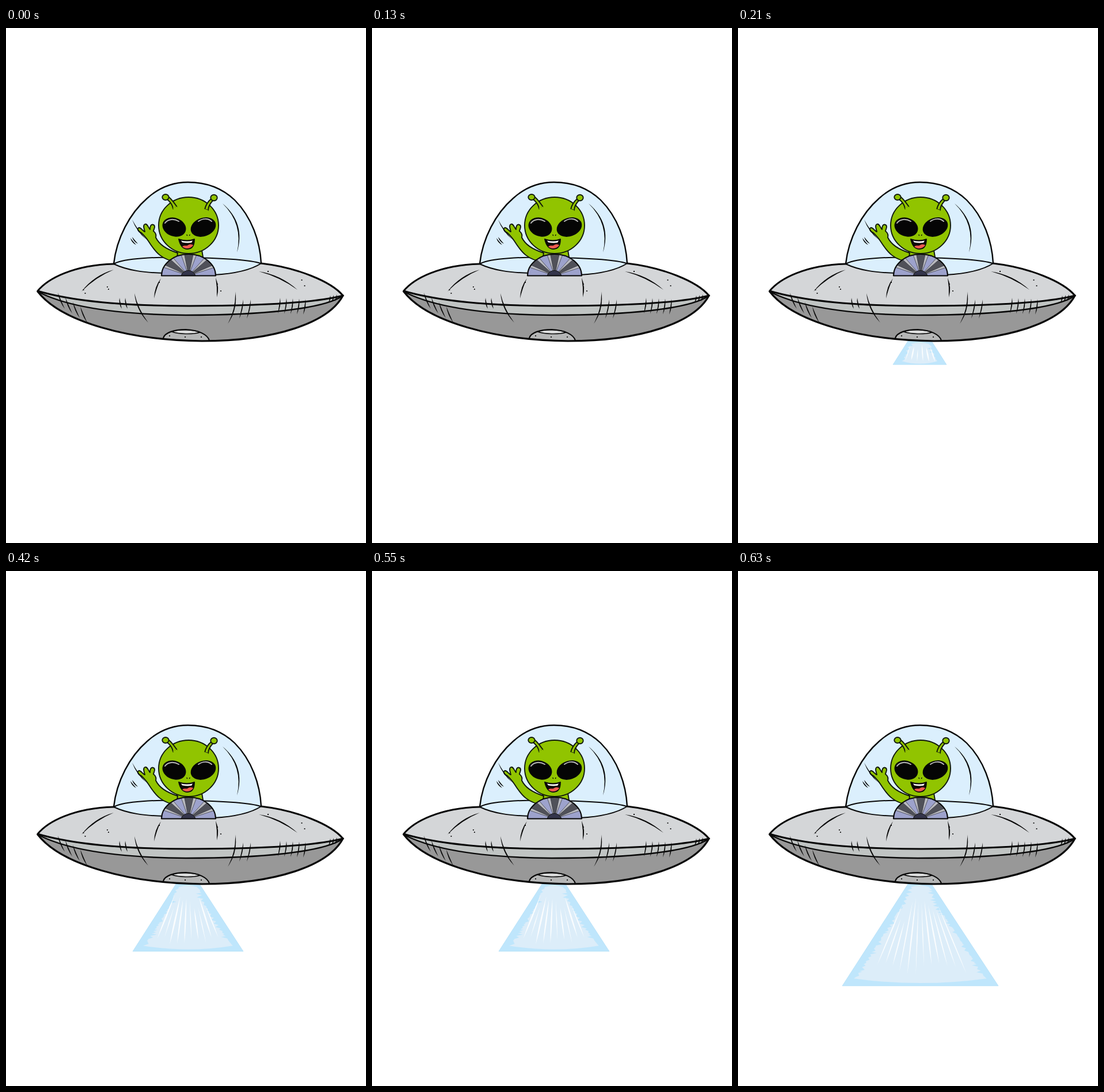
An HTML page for the animation above (840 ms loop, 625x895 px).

```html
<!DOCTYPE html>
<html lang="en">
<head>
<meta charset="utf-8">
<title>Flying saucer</title>
<style>
html, body { margin: 0; width: 100%; height: 100%; overflow: hidden; background: #fff; }
svg { display: block; width: 100vw; height: 100vh; }
.line { fill: none; stroke: #080808; stroke-linecap: round; stroke-linejoin: round; }
.green { fill: #91c400; stroke: #10180a; stroke-width: 1.9; stroke-linejoin: round; }
.beam { visibility: hidden; animation: .84s step-end infinite; }
#small { animation-name: second; }
#medium { animation-name: third; }
#large { animation-name: fourth; }
@keyframes second { 0% { visibility: hidden } 25% { visibility: visible } 50%, 100% { visibility: hidden } }
@keyframes third { 0% { visibility: hidden } 50% { visibility: visible } 75%, 100% { visibility: hidden } }
@keyframes fourth { 0% { visibility: hidden } 75%, 100% { visibility: visible } }
</style>
</head>
<body>
<svg viewBox="0 0 625 895">
  <defs>
    <path id="dome" d="M187 410C192 365 215 322 245 296C267 276 292 268 316 268C349 268 376 279 397 299C427 329 441 371 443 409"/>
    <path id="deck" d="M187 410C116 412 72 436 55 457C120 476 210 483 318 483C430 483 530 479 585 465C564 440 504 416 443 409"/>
    <path id="keel" d="M55 458C96 511 215 543 340 544C468 544 560 512 585 465"/>
    <path id="seam" d="M55 458C108 486 200 498 312 499C440 499 552 489 585 465"/>
    <path id="hatch" d="M273 539C275 530 291 524 312 524C335 525 350 533 353 543"/>
  </defs>

  <g id="small" class="beam"></g>
  <g id="medium" class="beam"></g>
  <g id="large" class="beam"></g>

  <!-- hull fills, lowest layer first -->
  <use href="#keel" fill="#989898"/>
  <use href="#seam" fill="#c0c4c3"/>
  <path fill="#c0c4c3" d="M55 457L318 470L585 465L318 490Z"/>
  <use href="#deck" fill="#d4d6d8"/>

  <!-- dome -->
  <path fill="#dbeffd" d="M187 410C192 365 215 322 245 296C267 276 292 268 316 268C349 268 376 279 397 299C427 329 441 371 443 409C418 424 370 430 318 430C260 429 212 422 187 410Z"/>
  <path class="line" stroke-width="2" d="M189 409C204 401 258 397 318 399C376 400 424 403 442 409"/>
  <path class="line" stroke-width="2" d="M187 410C212 422 242 425 273 426M361 429C396 427 426 420 443 409"/>

  <!-- pilot -->
  <path class="green" d="M298 386H340L342 398H292Z"/>
  <path class="green" d="M296 405C272 405 259 389 247 370C243 364 239 360 235 356C229 354 227 348 231 347C235 347 237 353 241 354C240 349 237 343 241 341C245 339 247 347 250 350C250 346 251 340 256 342C261 344 256 350 256 353C260 356 261 360 260 364C266 376 277 384 298 391Z"/>
  <ellipse class="green" cx="317" cy="343" rx="52" ry="49"/>
  <path class="green" d="M280 298C285 302 289 307 290 314L297 311C292 304 288 298 283 294Z"/>
  <path class="green" d="M356 297C350 302 347 307 345 315L351 317C351 309 355 304 360 299Z"/>
  <ellipse class="green" cx="277" cy="294" rx="5.7" ry="5"/>
  <ellipse class="green" cx="361" cy="295" rx="5.7" ry="5.2"/>
  <path fill="#91c400" d="M289 313L298 310L296 318ZM343 314L352 317L345 321Z"/>
  <g fill="#050505">
    <ellipse cx="292" cy="346" rx="21" ry="16" transform="rotate(20 292 346)"/>
    <ellipse cx="342.5" cy="346" rx="22.5" ry="16" transform="rotate(-20 342.5 346)"/>
  </g>
  <path fill="none" stroke="#b9b9b9" stroke-width="2" stroke-linecap="round" d="M276 339C281 332 291 331 300 336M334 336C341 331 350 330 357 336"/>
  <path class="line" stroke-width="1.5" d="M314 359.5L314.5 360.5M318.5 360.5L319 359.5"/>
  <path fill="#100908" stroke="#080808" stroke-width="1.8" stroke-linejoin="round" d="M300 367C309 370 319 370 327 367C327 378 324 384 315 384C306 384 302 376 300 367Z"/>
  <path fill="#fff" d="M304 369.5Q314 372 324 369.5L322 373Q314 374 306 372.5Z"/>
  <path fill="#f05a50" d="M306 380C309 377 313 379 315 378C319 375 322 376 325 377C322 384 311 385 306 380Z"/>

  <g id="panel"></g>
  <g id="marks" fill="#080808"></g>

  <!-- outlines -->
  <g class="line">
    <use href="#dome" stroke-width="2.4"/>
    <use href="#deck" stroke-width="3"/>
    <use href="#seam" stroke-width="2.5"/>
    <path fill="#b5b6b6" d="M273 539C275 530 291 524 312 524C335 525 350 533 353 543Z" stroke="none"/>
    <path fill="#dcdddd" stroke-width="1.5" d="M288 528C299 523 327 524 337 529C322 533 301 532 288 528Z"/>
    <use href="#hatch" stroke-width="2.2"/>
    <use href="#keel" stroke-width="3.2"/>
    <path stroke-width="2.2" d="M311 537h.1M284 535h.1M339 537h.1"/>
  </g>
</svg>
<script>
const $ = id => document.getElementById(id);
const lerp = (a, b, k) => a + (b - a) * k;

function add(id, d, attrs = {}) {
  const p = document.createElementNS('http://www.w3.org/2000/svg', 'path');
  p.setAttribute('d', d);
  for (const k in attrs) p.setAttribute(k, attrs[k]);
  $(id).append(p);
}

// Stroke that tapers at both ends; bend pushes its middle sideways.
function taper(x1, y1, x2, y2, width, bend = 0) {
  const dx = x2 - x1, dy = y2 - y1, len = Math.hypot(dx, dy);
  const ctrl = o => `${(x1 + x2) / 2 - dy / len * o} ${(y1 + y2) / 2 + dx / len * o}`;
  return `M${x1} ${y1}Q${ctrl(bend + width)} ${x2} ${y2}Q${ctrl(bend - width)} ${x1} ${y1}Z`;
}

function rng(seed) {
  return () => (seed = (seed * 16807) % 2147483647) / 2147483647;
}

// Control panel: a fan of wedges, each led by a pale sliver, around a dark hub.
function wedge(from, to, fill) {
  const rim = deg => {
    const a = deg * Math.PI / 180;
    return `${317 + 47 * Math.cos(a)} ${430.5 - 37.5 * Math.sin(a)}`;
  };
  add('panel', `M317 430.5L${rim(from)}A47 37.5 0 0 1 ${rim(to)}Z`,
    { fill, stroke: '#30313a', 'stroke-width': .7 });
}
const fan = 7, span = 180 / fan;
for (let i = 0; i < fan; i++) {
  const a = 180 - i * span;
  wedge(a, a - span, i % 2 ? '#505159' : '#9da2cc');
  if (i) wedge(a + 3, a - 4, '#b9bac0');
}
add('panel', 'M304 430.5A13 12.5 0 0 1 329 430.5Z', { fill: '#34354b', stroke: '#111' });
add('panel', 'M270 430.5A47 37.5 0 0 1 364 430.5Z', { class: 'line', 'stroke-width': 2 });

// Long creases on deck, glass and keel.
const crease = (...p) => add('marks', taper(...p));
crease(187, 420, 131, 458, 2.2, 9);
crease(269, 435, 257, 470, 2.2, 4);
crease(364, 434, 366, 468, 2.2, -4);
crease(439, 423, 506, 455, 2.2, -9);
crease(376, 305, 401, 390, 2.2, -27);
crease(219, 333, 243, 367, 1.6, 4);
crease(223, 461, 247, 512, 2, 8);
crease(398, 458, 385, 514, 2, -10);

// Rows of short scratches following the rim.
function scratches(n, x, y, stepX, stepY, dx, dy) {
  for (let i = 0; i < n; i++) {
    const sx = x + i * stepX, sy = y + i * stepY;
    crease(sx, sy, sx + dx, sy + dy, 1.8, Math.sign(dx) * 2);
  }
}
scratches(4, 90, 460, 13, 8, 12, 28);
scratches(2, 197, 469, 10, 0, 4, 19);
scratches(2, 412, 472, 13, 0, -7, 33);
scratches(5, 476, 469, 11, .5, -4, 27);
scratches(3, 563, 465, 5.5, -1, -3, 12);
scratches(2, 216, 365, 3, -2, 10, 12);

// Rivets come in pairs.
for (const [x, y] of [[177, 452], [136, 458], [266, 442], [370, 451], [455, 423], [516, 443]]) {
  const gap = x % 7;
  for (const s of [-1, 1]) add('marks', `M${x + s * gap / 2 - 1.1} ${y + s * gap}a1.1 1.1 0 1 0 2.2 0a1.1 1.1 0 1 0-2.2 0Z`);
}

// Light cone with a ragged pale core and a fan of white streaks.
function beam(id, left, right, bottom, rays) {
  const rand = rng(bottom * 31), top = 544, tall = bottom - top;
  add(id, `M295 ${top}H336L${right} ${bottom}H${left}Z`, { fill: '#bfe6fc', stroke: '#addcf5', 'stroke-width': .6 });

  const floor = bottom - 4 - tall * .05;
  const edge = (y, side, gap) => {
    const k = (y - top) / tall;
    return side < 0 ? lerp(295, left, k) + gap : lerp(336, right, k) - gap;
  };
  const ragged = side => {
    const pts = [];
    for (let y = top + 8; y < floor - 3; y += 3 + rand() * 5) {
      const gap = Math.min(13, 3 + (y - top) * .3);
      pts.push(`${edge(y, side, gap + rand() * 10)} ${y}`, `${edge(y + 2, side, gap)} ${y + 2.5}`);
    }
    return pts;
  };
  const lx = edge(floor, -1, 12), rx = edge(floor, 1, 12);
  add(id, `M300 ${top + 5}Q316 ${top} 331 ${top + 5}L${ragged(1).join('L')}L${rx} ${floor}` +
    `Q${(lx + rx) / 2} ${bottom + 3} ${lx} ${floor}L${ragged(-1).reverse().join('L')}Z`, { fill: '#dcedf9' });

  for (let i = 0; i < rays; i++) {
    const u = (i + .5) / rays * 2 - 1;
    const from = .12 + rand() * .25, to = .78 + rand() * .12;
    const at = k => [316 + u * lerp(17, (right - left) * .36, k), top + tall * k];
    add(id, taper(...at(from), ...at(to), 1.4 + rand() * 1.4), { fill: '#fff', opacity: .85 });
  }
}
beam('small', 269, 362, 585, 6);
beam('medium', 220, 412, 661, 10);
beam('large', 181, 452, 721, 12);
</script>
</body>
</html>
```
